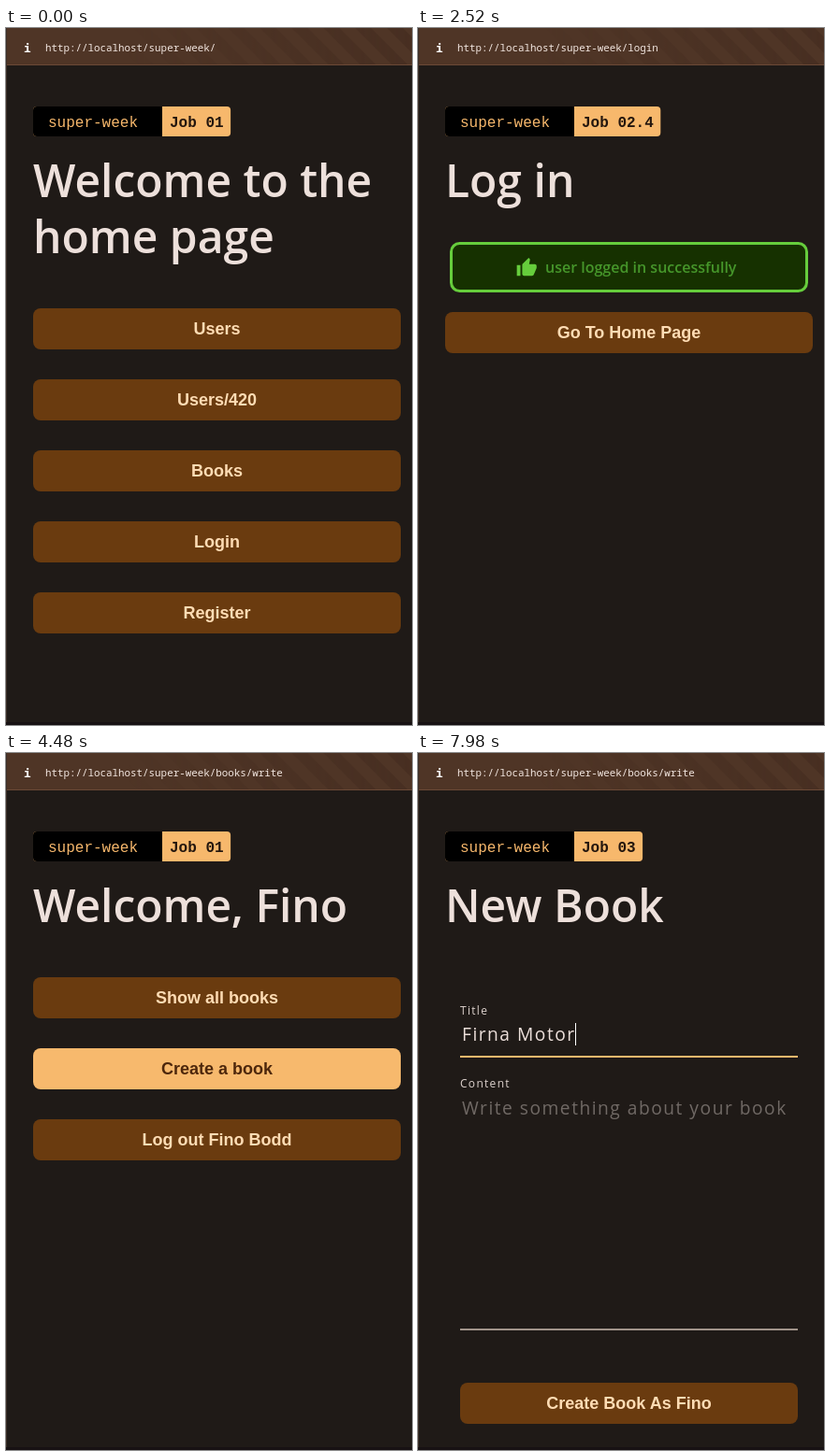
Write an HTML page that moves like this. It is 434 by 746 pixels and loops after 8000 ms.

```html
<!DOCTYPE html>
<html lang="en">
<head>
<meta charset="utf-8">
<title>super-week</title>
<style>
  html, body { margin: 0; width: 100%; height: 100%; overflow: hidden; background: #1f1a17; }
  svg { position: absolute; left: 0; top: 0; display: block; }
  text { white-space: pre; }
  .url { font: 500 10.85px "Noto Sans Mono", monospace; fill: #f3e7e1; }
  .info { font: 700 13px "Noto Sans Mono", monospace; fill: #fff; }
  .badge { font: 16px "Liberation Mono", monospace; fill: #f7b86c; }
  .job { font: 700 16px "Liberation Mono", monospace; fill: #24160e; }
  .title { font: 600 48px "Open Sans", sans-serif; fill: #ede0db; }
  .button { font: 700 18px "Liberation Sans", sans-serif; text-anchor: middle; }
  .label { font: 12px "Open Sans", sans-serif; letter-spacing: 1.3px; fill: #ded3ce; }
  .input { font: 19.2px "Open Sans", sans-serif; letter-spacing: 1.5px; fill: #ede0db; }
  .hint { fill: #706965; }
  .notice { font: 600 16px "Open Sans", sans-serif; fill: #46962a; }
</style>
</head>
<body>
<svg width="434" height="746" viewBox="0 0 434 746">
  <defs>
    <pattern id="stripes" width="24" height="24" patternUnits="userSpaceOnUse" patternTransform="rotate(-45)">
      <rect width="12" height="24" fill="#432b1f"/>
    </pattern>
    <linearGradient id="fade">
      <stop offset=".3" stop-color="#000"/>
      <stop offset="1" stop-color="#999"/>
    </linearGradient>
    <mask id="right"><rect width="434" height="39" fill="url(#fade)"/></mask>
  </defs>
  <rect width="434" height="746" fill="#1f1a17"/>
  <rect width="434" height="39" fill="#4f3526"/>
  <rect width="434" height="39" fill="url(#stripes)" mask="url(#right)"/>
  <rect y="39" width="434" height="1" fill="#6b4936"/>
  <rect width="1" height="746" fill="#3b2e27"/>
  <rect y="743" width="434" height="3" fill="#171113"/>
  <text class="info" x="19" y="25.5">i</text>
  <g id="page"></g>
</svg>
<script>
const LOOP = 8000, FADE = 150;
const AT = {
  loginHover: 560, loginPage: 1120, submitHover: 1400, submitLeave: 1610,
  emailFocus: 1680, passwordFocus: 1960, submitAgain: 2100, success: 2310,
  homeHover: 2660, memberPage: 3220, createHover: 3710, bookPage: 4620,
  titleFocus: 5320, typing: 5810
};
const KEY_DELAY = 216;
const BOOK_TITLE = 'Firna Motor';
const THUMB = 'M1 21h4V9H1v12zm22-11c0-1.1-.9-2-2-2h-6.31l.95-4.57.03-.32c0-.41-.17-.79-.44-1.06L14.17 1 7.59 7.59C7.22 7.95 7 8.45 7 9v10c0 1.1.9 2 2 2h9c.83 0 1.54-.5 1.84-1.22l3.02-7.05c.09-.23.14-.47.14-.73v-2z';
const page = document.getElementById('page');

const ramp = (t, start) => Math.min(1, Math.max(0, (t - start) / FADE));
const pulse = (t, start, end) => ramp(t, start) - ramp(t, end);
const mix = (from, to, k) => `color-mix(in srgb, ${to} ${k * 100}%, ${from})`;
const text = (cls, x, y, str, extra = '') => `<text class="${cls}" x="${x}" y="${y}" ${extra}>${str}</text>`;
const rect = (x, y, w, h, fill, extra = '') =>
  `<rect x="${x}" y="${y}" width="${w}" height="${h}" style="fill:${fill}" ${extra}/>`;

function button(y, caption, hover = 0, x = 29) {
  return rect(x, y, 451 - 2 * x, 44, mix('#6a3b0f', '#f7b96d', hover), 'rx="8"') +
    text('button', 225.5, y + 28.3, caption, `style="fill:${mix('#ffdcb4', '#4d270c', hover)}"`);
}

const buttons = (y, captions, active, hover) =>
  captions.map((c, i) => button(y + 76 * i, c, i === active ? hover : 0)).join('');

function field(y, label, hint, { value = '', focus = 0, lineY = y + 49, textY = y + 33 } = {}) {
  return text('label', 45, y + 5, label) +
    text(value ? 'input' : 'input hint', 47, textY, value || hint, value ? 'id="value"' : '') +
    rect(45, lineY, 361, 2, mix('#a09389', '#f7b96d', focus));
}

function header(url, job, ...lines) {
  const jobWidth = job.length * 9.6 + 15.5;
  return text('url', 42, 25, 'http://localhost/super-week/' + url) +
    rect(29, 84, 138 + jobWidth, 32, '#f7b86c', 'rx="4"') +
    '<path d="M167 84H33a4 4 0 0 0-4 4v24a4 4 0 0 0 4 4h134z"/>' +
    text('badge', 45, 106, 'super-week') + text('job', 175, 106, job) +
    lines.map((line, i) => text('title', 29, 181 + 60 * i, line)).join('');
}

function loginForm(t) {
  const hover = pulse(t, AT.submitHover, AT.submitLeave) + ramp(t, AT.submitAgain);
  return field(275, 'Email', 'Enter your email', { focus: pulse(t, AT.emailFocus, AT.passwordFocus) }) +
    field(353, 'Password', 'Enter your password', { focus: ramp(t, AT.passwordFocus) }) +
    button(460, 'Log in', hover, 45);
}

function successNotice(t) {
  return rect(35.5, 230.5, 380, 51, '#163100', 'rx="9" stroke="#66cd3c" stroke-width="3"') +
    `<path d="${THUMB}" fill="#66cd3c" transform="translate(104.7 245) scale(.96)"/>` +
    text('notice', 136, 262, 'user logged in successfully') +
    button(304, 'Go To Home Page', ramp(t, AT.homeHover));
}

function bookForm(t) {
  const typed = t < AT.typing ? 0 : Math.floor((t - AT.typing) / KEY_DELAY) + 1;
  return field(275, 'Title', 'Enter a book title',
      { value: BOOK_TITLE.slice(0, typed), focus: ramp(t, AT.titleFocus) }) +
    field(353, 'Content', 'Write something about your book', { lineY: 616, textY: 387 }) +
    button(674, 'Create Book As Fino', 0, 45) +
    (t >= AT.titleFocus ? rect(47, 289, 1, 24, '#fff', 'id="caret"') : '');
}

function scene(t) {
  const url = t < AT.loginHover ? '' : t < AT.homeHover ? 'login' : t < AT.createHover ? '' : 'books/write';
  if (t < AT.loginPage) {
    return header(url, 'Job 01', 'Welcome to the', 'home page') +
      buttons(300, ['Users', 'Users/420', 'Books', 'Login', 'Register'], 3, ramp(t, AT.loginHover));
  }
  if (t < AT.memberPage) {
    return header(url, 'Job 02.4', 'Log in') + (t < AT.success ? loginForm(t) : successNotice(t));
  }
  if (t < AT.bookPage) {
    return header(url, 'Job 01', 'Welcome, Fino') +
      buttons(240, ['Show all books', 'Create a book', 'Log out Fino Bodd'], 1, ramp(t, AT.createHover));
  }
  return header(url, 'Job 03', 'New Book') + bookForm(t);
}

let shown;
function draw(now) {
  const markup = scene(now % LOOP);
  if (markup !== shown) {
    page.innerHTML = shown = markup;
    const caret = document.getElementById('caret');
    const value = document.getElementById('value');
    if (caret && value) caret.setAttribute('x', Math.round(47 + value.getComputedTextLength() - 1));
  }
}

const start = performance.now();
function tick() {
  draw(performance.now() - start);
  requestAnimationFrame(tick);
}
tick();
</script>
</body>
</html>
```
